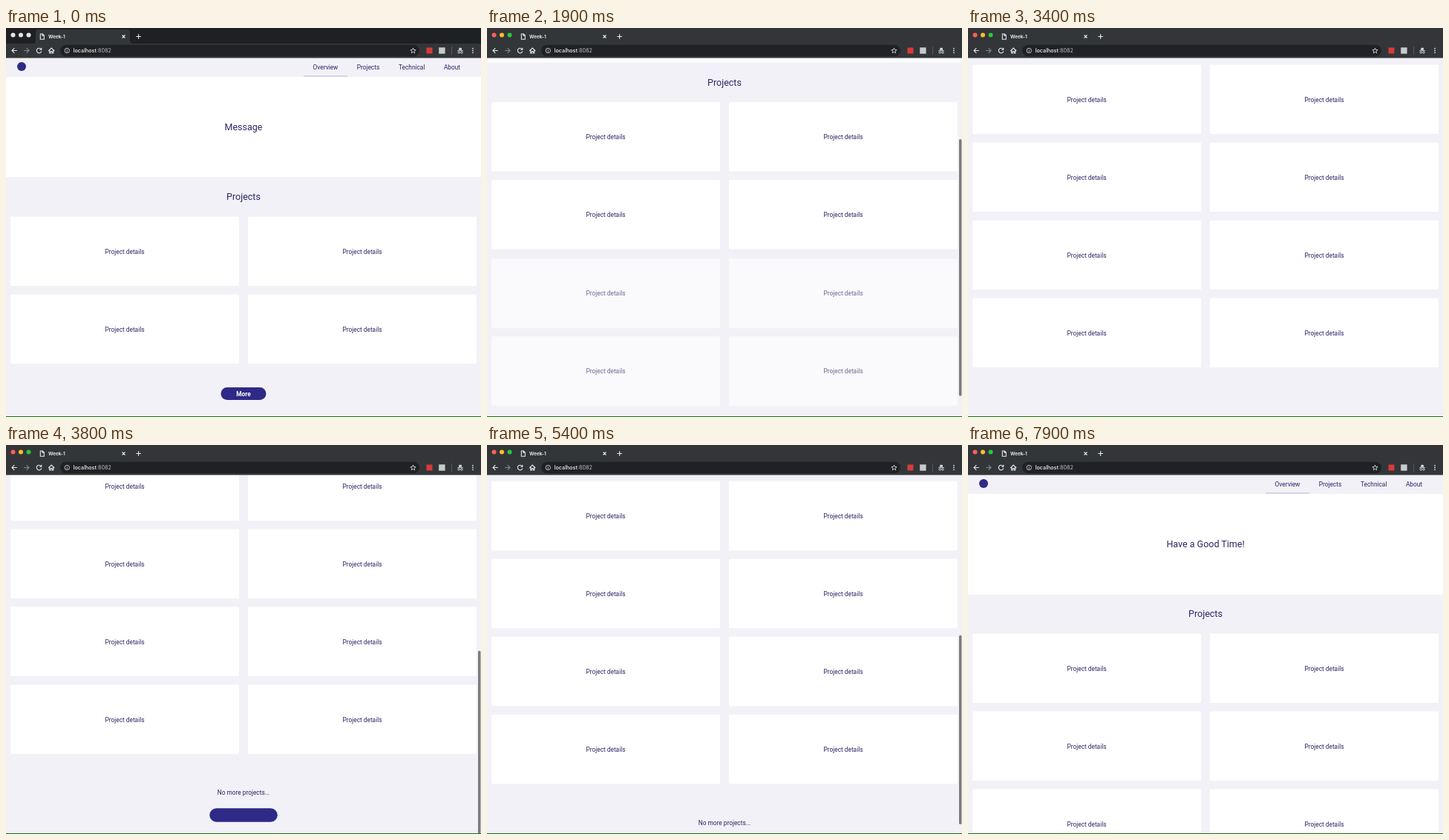
An HTML page that plays this animation: 640 by 525 pixels, repeating every 8 s.

```html
<!DOCTYPE html>
<html lang="en">
<head>
<meta charset="utf-8">
<title>Week-1</title>
<style>
  html, body { margin: 0; width: 100%; height: 100%; overflow: hidden; background: #f2f1f7; }
  svg { display: block; width: 640px; height: 525px; }
  text { font-family: Roboto, sans-serif; font-size: 8.33px; fill: #2a2665; }
  .mid { text-anchor: middle; }
  .big { font-size: 12.5px; }
  .btn { fill: #2f2a87; }
  .label { font-weight: 700; fill: #fff; }
  .ui { font-family: Inter, sans-serif; font-size: 7.2px; fill: #f1f3f4; }
  .line { fill: none; stroke: #e8eaed; stroke-width: 1.1; }
</style>
</head>
<body>
<svg viewBox="0 0 640 525">
  <rect width="640" height="525" fill="#f2f1f7"/>
  <g id="page">
    <circle cx="21" cy="52" r="6" fill="#2f2a87"/>
    <g class="mid">
      <text x="430.5" y="55.5">Overview</text>
      <text x="488" y="55.5">Projects</text>
      <text x="546.7" y="55.5">Technical</text>
      <text x="601" y="55.5">About</text>
    </g>
    <rect x="401" y="64.5" width="59" height="1" fill="#bbb8d8"/>
    <rect id="hero" y="66" width="640" height="135" fill="#fff"/>
    <text id="first" class="mid big" x="320" y="137.7">Message</text>
    <text id="second" class="mid big" x="320" y="137.7">Have a Good Time!</text>
    <text class="mid big" x="320" y="232">Projects</text>
    <g id="rows"></g>
    <g id="more">
      <rect class="btn" x="289.5" y="485" width="61" height="17" rx="8.5"/>
      <text class="mid label" x="320" y="496.5">More</text>
    </g>
    <g id="end">
      <text class="mid" x="320" y="928.3">No more projects...</text>
      <rect class="btn" x="274.3" y="946.3" width="91.5" height="18.5" rx="9.25"/>
      <text id="back" class="mid label" x="320" y="958.6">Back to Top</text>
    </g>
  </g>
  <rect id="thumb" x="636" width="3.5" rx="1.75" fill="#7c7c7e"/>

  <rect id="strip" width="640" height="21"/>
  <path d="M36 21Q40 21 40 17V6Q40 2 44 2H163Q167 2 167 6V17Q167 21 171 21H640V40.5H0V21Z" fill="#323639"/>
  <g id="lights">
    <circle cx="9.5" cy="9.5" r="3"/>
    <circle cx="20" cy="9.5" r="3"/>
    <circle cx="30.5" cy="9.5" r="3"/>
  </g>
  <path class="line" stroke-width=".8" d="M46.3 8H49.3L51.3 10V15.3H46.3ZM49 8V10.3H51.3"/>
  <text class="ui" x="57" y="13.8" style="font-size:6.4px;font-weight:600">Week-1</text>
  <path class="line" d="M156.5 9.5l4 4m0-4l-4 4M175.3 11.5h6.6m-3.3-3.3v6.6"/>
  <path class="line" d="M14.8 30.5H8m3.3-3.3L8 30.5l3.3 3.3"/>
  <path class="line" style="stroke:#85888c" d="M24.2 30.5H31m-3.3-3.3l3.3 3.3l-3.3 3.3"/>
  <path class="line" d="M47.2 28.5A3.3 3.3 0 1 0 47.8 31.3M47.8 26.8V29.3H45.2"/>
  <path class="line" d="M57.2 31L61.2 27L65.2 31M58.7 30V34H60.2V31.5H62.2V34H63.7V30"/>
  <rect x="73" y="22.7" width="484" height="15.6" rx="7.8" fill="#202124"/>
  <circle class="line" style="stroke-width:.8" cx="82.3" cy="30.5" r="3.2"/>
  <path class="line" style="stroke-width:.8" d="M82.3 28.7v.8m0 .7v2.3"/>
  <text class="ui" x="90.7" y="33.1"><tspan font-weight="500">localhost</tspan><tspan fill="#bdc1c6">:8082</tspan></text>
  <path class="line" style="stroke-width:.8" d="M548.5 27l1 2.4 2.6.2-2 1.7.6 2.5-2.2-1.4-2.2 1.4.6-2.5-2-1.7 2.6-.2Z"/>
  <rect x="566.5" y="26.5" width="8" height="8" fill="#d93a38"/>
  <rect x="583.2" y="26.3" width="8.4" height="8.4" fill="#c9cacc"/>
  <rect x="600" y="25" width=".8" height="11" fill="#5f6368"/>
  <path d="M608.3 30.2h7.6v.8h-7.6zM609.8 29.7l.8-3h3l.8 3z" fill="#dadce0"/>
  <path class="line" style="stroke-width:.8" d="M608.9 32.9a1.3 1.3 0 1 0 2.6 0a1.3 1.3 0 1 0-2.6 0M612.7 32.9a1.3 1.3 0 1 0 2.6 0a1.3 1.3 0 1 0-2.6 0"/>
  <g fill="#dadce0">
    <circle cx="629" cy="27.7" r=".9"/>
    <circle cx="629" cy="30.5" r=".9"/>
    <circle cx="629" cy="33.3" r=".9"/>
  </g>
  <rect y="524" width="640" height="1" fill="#147014"/>
</svg>
<script>
const LOOP = 8000, VIEW = 492, ROW = 105;
const $ = id => document.getElementById(id);
const set = (el, attrs) => { for (const k in attrs) el.setAttribute(k, attrs[k]); };

const card = (x, y) =>
  `<rect x="${x}" y="${y}" width="308" height="93.5" rx="1.5" fill="#fff"/>
   <text class="mid" x="${x + 154}" y="${y + 50}">Project details</text>`;
$('rows').innerHTML = [0, 1, 2, 3, 4, 5].map(i => {
  const y = 254.5 + i * ROW;
  return `<g>${card(6, y)}${card(326, y)}</g>`;
}).join('');
const rows = [...$('rows').children];
const lights = [...$('lights').children];

const ramp = (t, from, to) => Math.min(1, Math.max(0, (t - from) / (to - from)));
const ease = (t, start, length) => (1 - Math.cos(Math.PI * ramp(t, start, start + length))) / 2;
const pulse = (t, on, off) => ramp(t, on, on + 100) - ramp(t, off, off + 300);

function draw(t) {
  const scroll = 206 * ease(t, 1500, 600) + 209 * ease(t, 2900, 450)
    + 41 * ease(t, 3500, 250) - 456 * ease(t, 5300, 520);
  const range = t < 1500 ? 0 : t < 2900 ? 206 : t < 3500 ? 415 : 456;
  const doc = VIEW + range;
  set($('page'), { transform: `translate(0 ${-scroll})` });
  set($('thumb'), {
    y: 41 + scroll * VIEW / doc,
    height: VIEW * VIEW / doc,
    opacity: pulse(t, 1500, 2350) + pulse(t, 3500, 4250) + pulse(t, 5300, 6350)
  });

  // project rows arrive in pairs
  const shown = [1, ramp(t, 1500, 2100), ramp(t, 2900, 3350)];
  rows.forEach((row, i) => {
    const a = shown[i >> 1];
    set(row, { opacity: a, transform: `translate(0 ${(1 - a) * 4})` });
  });
  set($('more'), {
    opacity: t < 2900 ? 1 : 0,
    transform: `translate(0 ${t < 1500 ? 0 : 2 * ROW})`
  });
  set($('end'), { opacity: ramp(t, 3450, 3750) });
  set($('back'), { opacity: ramp(t, 3800, 4100) });

  set($('first'), { opacity: 1 - ramp(t, 6750, 6900) });
  set($('second'), { opacity: ramp(t, 6900, 7100) });
  set($('hero'), { height: t < 6800 ? 135 : 136 });

  const focused = t >= 600;
  set($('strip'), { fill: focused ? '#333539' : '#1f2023' });
  lights.forEach((l, i) => set(l, { fill: focused ? ['#ff5f57', '#febc2e', '#28c840'][i] : '#e6e6e6' }));
}

function tick() {
  draw(Math.floor((performance.now() + 10) / 100) * 100 % LOOP);
  requestAnimationFrame(tick);
}
tick();
</script>
</body>
</html>
```
